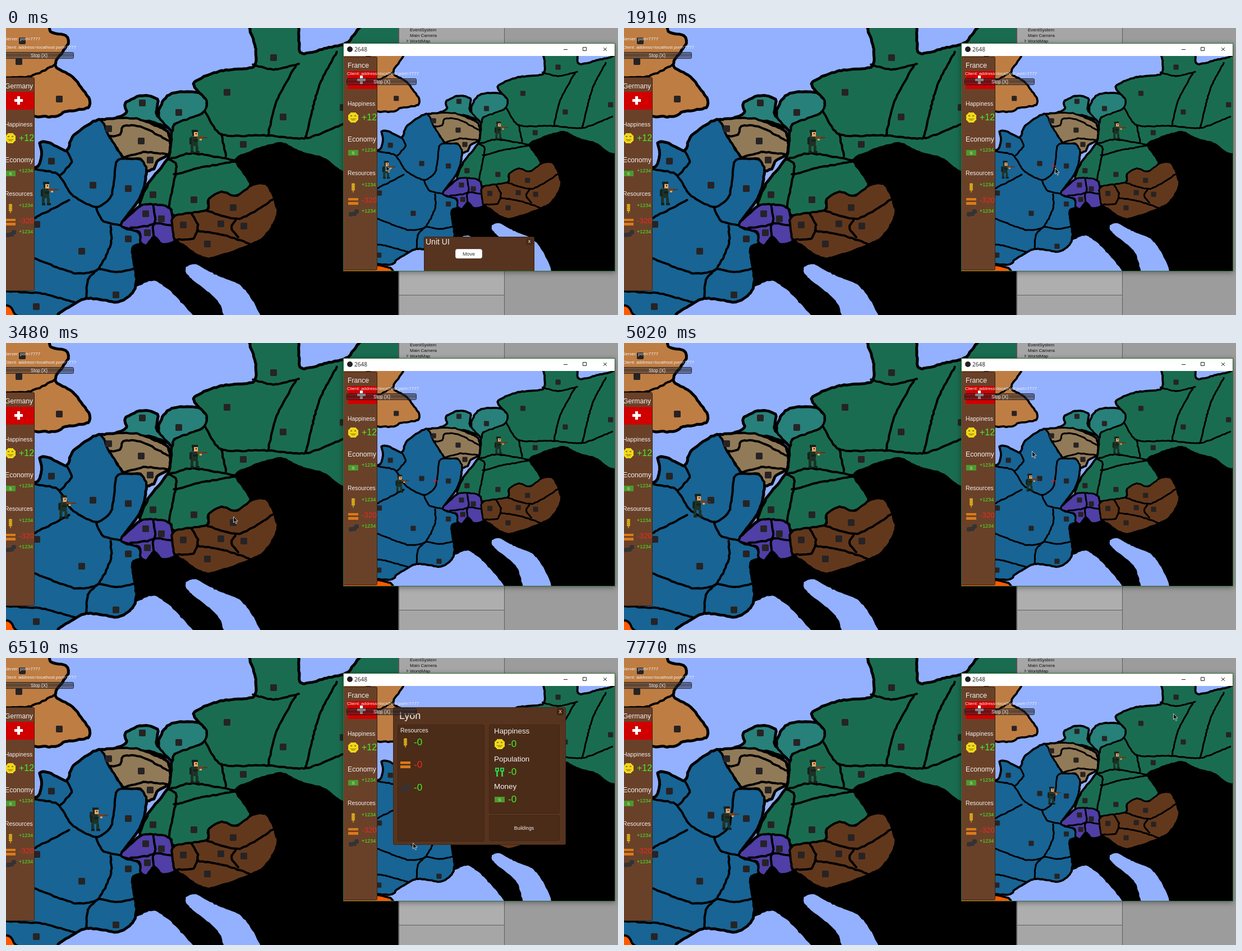
An HTML page with a canvas that plays this animation: 1091x513 px, repeating every 8000 ms.

```html
<!DOCTYPE html>
<html lang="en">
<head>
<meta charset="utf-8">
<style>
  html, body { margin: 0; width: 100%; height: 100%; overflow: hidden; background: #a0a0a0; }
  canvas { display: block; }
</style>
</head>
<body>
<canvas id="stage" width="1091" height="513"></canvas>
<script>
const LOOP = 8000;
const SANS = '"Liberation Sans", Arial, sans-serif';
const WHITE = '#f4f0ee', LIME = '#46f026', RED = '#ee2a22', YELLOW = '#f0d818';
const SEA = '#93b1ff', BLACK = '#000', INK = '#222';
const MAP_SCALE = 0.755, MAP_X = 624, MAP_Y = 30;

const stage = document.getElementById('stage');
let g = stage.getContext('2d');

function box(x, y, w, h, color) {
  g.fillStyle = color;
  g.fillRect(x, y, w, h);
}

function frame(x, y, w, h, fill, edge, radius = 2) {
  g.beginPath();
  g.roundRect(x + .5, y + .5, w - 1, h - 1, radius);
  g.fillStyle = fill;
  g.fill();
  g.strokeStyle = edge;
  g.lineWidth = 1;
  g.stroke();
}

function label(text, x, y, size, color = WHITE, align = 'left', family = SANS) {
  g.font = `${size}px ${family}`;
  g.textAlign = align;
  g.fillStyle = color;
  g.fillText(text, x, y + size * .36);
}

function at(x, y, draw) {
  g.save();
  g.translate(x, y);
  draw();
  g.restore();
}

let seed = 7;
function jitter(size) {
  seed = (seed * 16807) % 2147483647;
  return (seed / 2147483647 - .5) * size;
}

const points = text => text.trim().split(/\s+/).map(p => p.split(',').map(Number));

// Rough hand-drawn line: a smooth spline sampled every few pixels with seeded noise.
function curve(text, closed) {
  const pts = points(text), n = pts.length, path = new Path2D();
  const pick = i => closed ? pts[(i + n) % n] : pts[Math.max(0, Math.min(n - 1, i))];
  for (let i = 0; i < (closed ? n : n - 1); i++) {
    const [a, b, c, d] = [-1, 0, 1, 2].map(k => pick(i + k));
    const steps = Math.ceil(Math.hypot(c[0] - b[0], c[1] - b[1]) / 5);
    for (let s = 0; s < steps; s++) {
      const u = s / steps, v = 1 - u;
      const [x, y] = [0, 1].map(k => v * v * v * b[k] + u * u * u * c[k]
        + 3 * v * v * u * (b[k] + (c[k] - a[k]) / 8)
        + 3 * v * u * u * (c[k] - (d[k] - b[k]) / 8) + jitter(1.6));
      path.lineTo(x, y);
    }
  }
  if (closed) path.closePath();
  else path.lineTo(...pts[n - 1]);
  return path;
}

const lands = [];
function land(color, outline, towns = '', borders = []) {
  lands.push({ color, shape: curve(outline, true), towns: towns ? points(towns) : [], borders: borders.map(b => curve(b)) });
}

land('#be7d43', `-40,-20 66,-10 80,8 106,14 110,28 87,66 118,88 147,124 146,142 105,149 80,158 -40,140`,
  '95,127 23,60 29,23', ['-40,88 40,87 87,66']);

land('#ff695c', '486,-10 500,7 516,-10');

land('#1a6c50', `434,-20 446,38 440,70 380,78 335,99 357,130 350,152 300,172 291,230 256,275 240,318
  292,322 300,335 358,326 362,305 410,300 436,280 410,237 440,220 490,206 525,222 570,235 605,258
  720,260 720,-20 650,-20 610,25 572,36 525,44 515,-20`,
  '477,53 394,115 494,159 423,208 601,142 262,298 335,307',
  ['440,66 480,74 522,64', '516,68 482,132 467,192', '590,42 560,98 548,140 534,196',
    '354,148 384,190 468,192 535,197 605,170', '384,190 392,229', '291,235 332,224 410,237',
    '291,235 304,248 290,320', '300,262 345,250 412,238']);

land('#28807a', '194,165 215,152 213,134 242,121 270,128 268,155 295,180 255,166', '243,134');
land('#28807a', '282,128 300,116 340,115 357,130 350,152 300,172 296,184 272,156', '308,151');

land('#917a58', '167,166 232,162 284,183 292,200 290,226 271,236 263,251 250,254 240,234 210,231 185,195',
  '183,180 241,202 257,236', ['184,194 204,190 208,176 240,176 289,201', '212,231 245,222 290,226']);

land('#186494', `-40,255 50,250 64,230 61,206 78,206 108,220 121,192 166,164 185,195 210,232 240,235
  250,254 240,301 205,352 236,365 240,384 225,394 232,450 225,473 200,489 143,483 97,507 76,520 -40,488`,
  '81,238 155,281 218,287 55,351 135,399 218,377 196,477 54,498',
  ['109,221 117,240 98,262', '48,252 92,261 118,298 160,320 188,300 196,241 212,233', '112,308 50,340',
    '160,320 174,346 205,352', '186,354 187,385 164,431 122,438 46,410', '164,431 200,436 228,430',
    '164,431 146,450 143,483', '-20,470 60,474 122,490']);

land('#4f3fa6', '205,352 240,318 270,316 292,322 298,343 300,381 279,386 264,373 251,389 240,383 237,365',
  '249,332 277,341 252,366', ['262,317 264,350 222,357', '299,354 264,350 264,374']);

land('#62381c', `299,337 358,326 362,305 385,293 410,300 440,280 466,281 484,325 477,350 450,381 360,412
  316,388 300,376`,
  '316,352 383,350 405,321 424,354 359,386',
  ['330,331 342,352 334,376 306,378', '358,326 416,341 480,304', '340,362 392,371 434,386', '410,341 402,358 414,374']);

land('#ff5a00', '-40,494 6,497 18,513 82,530 76,550 -40,550');

const blackLand = curve('225,378 300,300 410,235 490,204 720,200 720,560 225,560', true);
const waters = ['140,560 190,494 234,462 268,453 312,490 352,560',
  '321,428 339,423 372,440 418,460 446,499 466,560 405,560 379,490 326,444'].map(w => curve(w, true));

function drawMap() {
  box(-60, -20, 800, 600, SEA);
  g.lineJoin = g.lineCap = 'round';
  g.fillStyle = g.strokeStyle = BLACK;
  g.fill(blackLand);
  g.fillStyle = SEA;
  waters.forEach(w => g.fill(w));
  g.lineWidth = 6;
  lands.forEach(l => g.stroke(l.shape));
  g.lineWidth = 4;
  for (const { color, shape, borders } of lands) {
    g.fillStyle = color;
    g.fill(shape);
    borders.forEach(b => g.stroke(b));
    g.stroke(shape);
  }
  for (const { towns } of lands) {
    for (const [x, y] of towns) frame(x - 6, y - 6, 12, 12, '#272324', '#272324', 1);
  }
}

function soldier(x, y) {
  at(x, y, () => {
    const coat = '#1c3326', dark = '#15211c', skin = '#eaa565', wood = '#74401f';
    box(-6, -21, 11, 5, dark);
    box(-5, -16, 3, 6, dark);
    box(-2, -17, 7, 8, skin);
    box(1, -15, 2, 2, dark);
    box(-8, -9, 13, 17, coat);
    box(-10, -7, 4, 12, dark);
    box(-3, -4, 8, 4, dark);
    box(4, -9, 11, 4, wood);
    box(8, -5, 4, 3, skin);
    box(14, -8, 8, 2, '#573420');
    box(-8, 8, 5, 10, coat);
    box(1, 8, 5, 10, coat);
    box(-8, 17, 6, 4, dark);
    box(1, 17, 7, 4, dark);
  });
}

function smiley(x, y) {
  at(x, y, () => {
    box(-5, -9, 10, 18, YELLOW);
    box(-9, -5, 18, 10, YELLOW);
    box(-7, -7, 14, 14, YELLOW);
    const line = '#8d7c10';
    for (const side of [-5, 2]) box(side, -4, 3, 2, line);
    box(-5, 2, 10, 1, line);
    box(-3, 4, 6, 1, line);
  });
}

function cash(x, y) {
  box(x - 9, y - 5, 18, 10, '#4c9a2c');
  label('S', x, y, 8, '#d8ecc8', 'center');
}

function wheat(x, y) {
  box(x - 1, y - 8, 2, 17, '#b98b12');
  for (let i = 0; i < 4; i++) box(x - 3, y - 7 + i * 3.2, 6, 2.6, '#dcaf1c');
}

function planks(x, y) {
  for (const dy of [-6, 1]) box(x - 9, y + dy, 18, 5, '#d97a1c');
  box(x - 9, y - 2, 18, 1, '#8f4a10');
}

function coal(x, y) {
  for (const [dx, dy] of [[-9, -2], [-3, -3], [1, -7]]) frame(x + dx, y + dy, 8, 8, '#343333', '#343333');
}

function people(x, y) {
  for (const dx of [-5, 4]) {
    box(x + dx - 3, y - 8, 7, 7, '#36c94a');
    box(x + dx - 1, y - 6, 3, 3, '#234d22');
    box(x + dx - 1, y - 1, 3, 9, '#36c94a');
  }
}

function sidebar(country) {
  frame(601, 51, 61, 382, '#694129', '#3a2213');
  label(country, 609, 67, 12.2);
  box(609, 77, 52, 32, '#d00000');
  box(631, 85, 5, 15, '#fff');
  box(626, 90, 15, 5, '#fff');
  label('Happiness', 609, 135, 10.4);
  smiley(619, 160);
  label('+12', 634, 159, 16, LIME);
  label('Economy', 609, 199, 12.2);
  cash(619, 223);
  label('+1234', 634, 218, 9, LIME);
  label('Resources', 609, 259, 10.4);
  wheat(619, 285);
  label('+1234', 634, 280, 9, LIME);
  planks(619, 310);
  label('-320', 634, 307, 13.5, RED);
  coal(620, 331);
  label('+1234', 634, 327, 9, LIME);
}

function network() {
  label('Client: address=localhost port=7777', 608, 81, 8);
  const shade = g.createLinearGradient(0, 90, 0, 102);
  shade.addColorStop(0, 'rgba(70,70,80,.55)');
  shade.addColorStop(.45, 'rgba(25,25,30,.6)');
  shade.addColorStop(1, 'rgba(60,60,75,.45)');
  frame(607, 90, 125, 12, shade, 'rgba(15,12,12,.75)');
  label('Stop (X)', 670, 96, 8.2, WHITE, 'center');
}

function unitPanel() {
  frame(745, 373, 197, 63, '#573420', '#3a2213');
  label('Unit UI', 748, 382, 14);
  frame(927, 376, 12, 12, '#482a18', '#482a18');
  label('x', 933, 381, 9, WHITE, 'center');
  frame(801, 395, 48, 17, '#fff', '#e4e4e4', 3);
  label('Move', 825, 404, 9, '#333', 'center');
}

function cityPanel() {
  const well = (x, y, w, h) => frame(x, y, w, h, '#4b2c18', '#422512');
  const stat = (icon, x, y, color = LIME) => {
    icon(x, y + 1);
    label('-0', x + 15, y, 17, color);
  };
  frame(690, 88, 308, 246, '#57341f', '#442614');
  well(698, 119, 155, 209);
  well(861, 119, 126, 159);
  well(861, 281, 126, 46);
  label('Lyon', 701, 103, 18);
  frame(982, 90, 12, 12, '#432614', '#351d0e');
  label('X', 988, 96, 8.5, WHITE, 'center');
  label('Resources', 703, 129, 10.4);
  stat(wheat, 712, 150);
  stat(planks, 712, 190, RED);
  stat(coal, 712, 231);
  ['Happiness', 'Population', 'Money'].forEach((name, i) => {
    label(name, 870, 130 + i * 49.7, 13.4);
    stat([smiley, people, cash][i], 880, 153 + Math.round(i * 49.5));
  });
  label('Buildings', 923.5, 304, 8.7, WHITE, 'center');
}

function editor() {
  box(700, 0, 391, 513, '#9c9c9c');
  box(701, 0, 187, 513, '#a6a6a6');
  box(701, 435, 187, 43, '#aeaeae');
  box(701, 477, 187, 1, '#5f5f5f');
  box(888, 0, 1, 513, '#5c5c5c');
  box(699, 0, 2, 513, '#555');
  ['EventSystem', 'Main Camera', 'WorldMap'].forEach((name, i) => label(name, 720, 3 + 10 * i, 8, '#111'));
  g.fillStyle = '#6b6b6b';
  g.fill(new Path2D('M714 20l4 3l-4 3z'));
}

function clipClient() {
  g.beginPath();
  g.rect(602, 50, 483, 384);
  g.clip();
}

function clientWindow() {
  g.save();
  g.shadowColor = 'rgba(0,0,0,.4)';
  g.shadowBlur = 9;
  g.shadowOffsetY = 2;
  box(601, 27, 485, 408, '#2f6a36');
  g.restore();
  box(602, 28, 483, 22, '#fff');
  g.fillStyle = INK;
  g.beginPath();
  g.arc(613, 38, 5, 0, 7);
  g.fill();
  label('2648', 621, 38, 10, INK, 'left', '"Open Sans", sans-serif');
  g.strokeStyle = INK;
  g.lineWidth = 1;
  g.stroke(new Path2D('M994 38.5h7M1028.5 34.5h6v6h-6zM1065 35l6 6M1071 35l-6 6'));
  clipClient();
  g.setTransform(MAP_SCALE, 0, 0, MAP_SCALE, MAP_X, MAP_Y);
  drawMap();
}

function cross(x, y) {
  box(x - 4, y, 9, 1, '#e8203a');
  box(x, y - 4, 1, 9, '#e8203a');
}

const arrow = new Path2D('M0 0V10.5L2.5 8.3L4.3 12.5L6 11.8L4.3 7.7H7.7Z');
function pointer(x, y) {
  at(x + .5, y + .5, () => {
    g.fillStyle = '#111';
    g.fill(arrow);
    g.strokeStyle = '#eee';
    g.lineWidth = .8;
    g.stroke(arrow);
  });
}

const ORDER = 940, MARCH = 1910, CITY_OPEN = 6510, CITY_CLOSE = 7770;

// Pointer stops: time, x, y, and in how many equal steps it is reached.
const stops = [
  [0, 677, 245], [70, 679, 248], [720, 840, 402],
  [ORDER, 815, 402], [1590, 765, 246, 13],
  [MARCH, 768, 250], [2350, 777, 285, 6], [2500, 763, 310], [3040, 752, 330, 5],
  [3230, 709, 306], [3480, 405, 310], [3790, 870, 222, 2], [3980, 743, 195], [4290, 727, 193],
  [4810, 833, 200], [5020, 727, 193, 2], [5220, 802, 250], [5690, 725, 330, 2],
  [CITY_OPEN, 725, 330, 8], [6610, 725, 330],
  [7280, 977, 95], [7480, 985, 92], [CITY_CLOSE, 979, 99, 3]
];

// The picture only refreshes on these steps and holds in between.
const steps = stops.flatMap(([t, x, y, count = 1], i) => {
  const [t0, x0, y0] = stops[Math.max(0, i - 1)];
  return Array.from({ length: count }, (_, n) => {
    const k = (n + 1) / count, mix = (a, b) => a + (b - a) * k;
    return { t: mix(t0, t), x: Math.round(mix(x0, x)), y: Math.round(mix(y0, y)) };
  });
});

const screen = g;
function prerender(draw) {
  const layer = document.createElement('canvas');
  layer.width = 1091;
  layer.height = 513;
  g = layer.getContext('2d');
  draw();
  g = screen;
  return layer;
}

const backdrop = prerender(() => {
  drawMap();
  editor();
});
const clientView = prerender(clientWindow);

function render(time) {
  const { t, x, y } = steps.findLast(step => step.t <= time + .01);
  const walked = t < MARCH ? 0 : Math.min(115, 2 + .0187 * (t - MARCH));
  const troops = () => {
    soldier(337, 203);
    soldier(72 + walked, 296 - walked * .087);
  };

  g.drawImage(backdrop, 0, 0);
  troops();
  at(-611, 37, () => sidebar('Germany'));
  at(-611, -47, network);
  label('Server: port=7777', -3, 19, 8);

  g.drawImage(clientView, 0, 0);
  g.save();
  clipClient();
  if (t >= MARCH) cross(765, 246);
  else if (t >= ORDER) cross(x, y);
  at(MAP_X, MAP_Y, () => {
    g.scale(MAP_SCALE, MAP_SCALE);
    troops();
  });
  sidebar('France');
  if (t < ORDER) unitPanel();
  if (t >= CITY_OPEN && t < CITY_CLOSE) cityPanel();
  network();
  g.restore();
  pointer(x, y);
}

function loop() {
  render(performance.now() % LOOP);
  requestAnimationFrame(loop);
}
loop();
</script>
</body>
</html>
```
